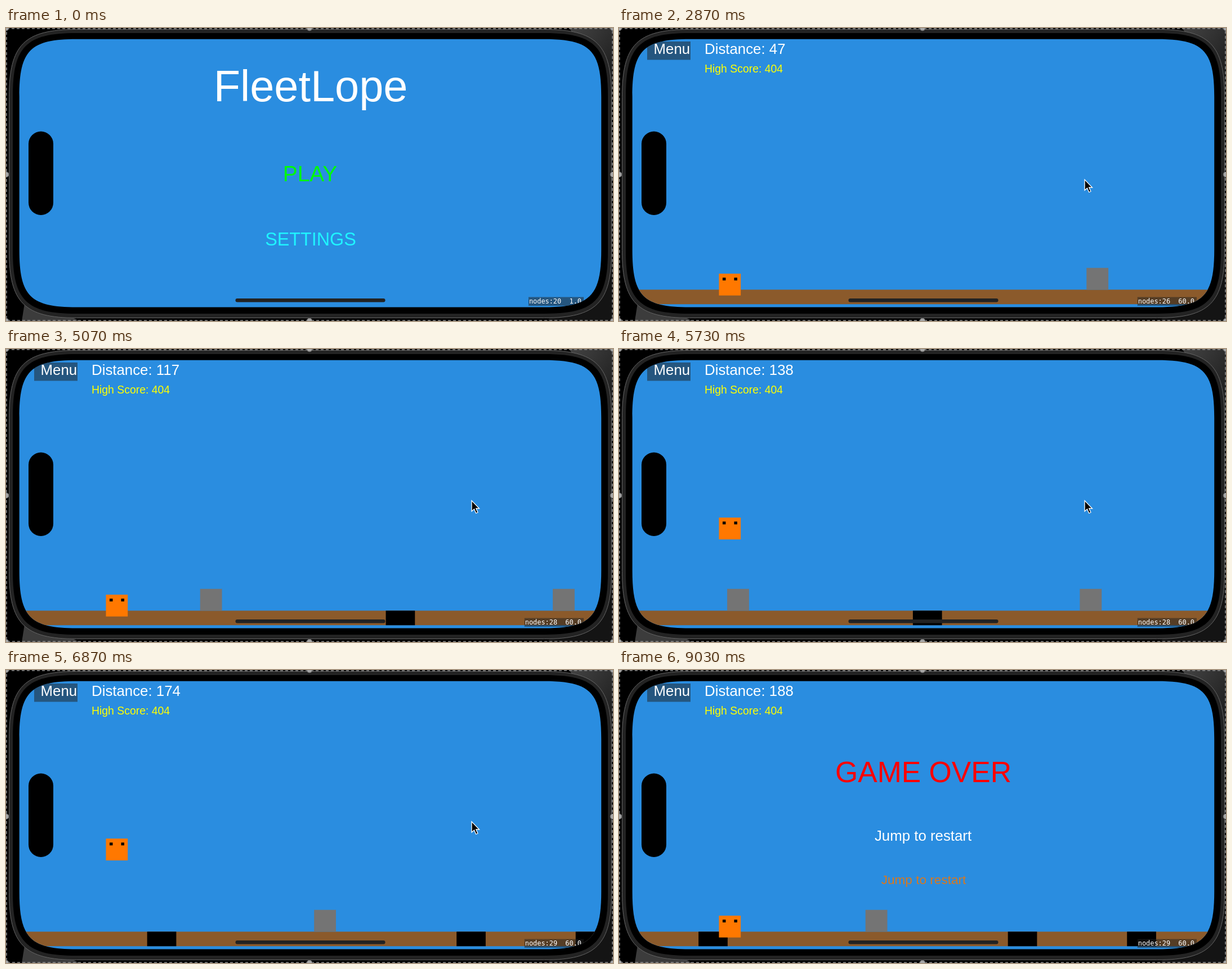
Animation of 1078 by 520 pixels, one loop 9060 ms. Source, as an HTML page:

```html
<!DOCTYPE html>
<html lang="en">
<head>
<meta charset="utf-8">
<title>Runner game</title>
<style>
  html, body { margin: 0; width: 100%; height: 100%; overflow: hidden; background: #000; }
  svg { display: block; width: 100vw; height: 100vh; }
  text { font-family: "Liberation Sans", Arial, sans-serif; fill: #fff; white-space: pre; }
  .mid { text-anchor: middle; }
  .mono { font: 11.9px "DejaVu Sans Mono", monospace; text-anchor: end; }
</style>
</head>
<body>
<svg viewBox="0 0 1078 520">
  <defs>
    <clipPath id="screen"><path id="glass"/></clipPath>
    <linearGradient id="dusk" x1="0" x2="1" y1="0" y2="1">
      <stop offset="0" stop-color="#444"/><stop offset="1" stop-color="#181818"/>
    </linearGradient>
  </defs>

  <!-- desktop and phone body -->
  <rect width="1078" height="520"/>
  <path d="M1000 0H1078V110Z" fill="url(#dusk)"/>
  <path d="M36 470L130 520H28Z" fill="#3c3c3c"/>
  <path d="M960 520L1078 410V520Z" fill="#141414"/>
  <path id="body" fill="#232323" stroke="#666"/>
  <path id="bezel"/>

  <g clip-path="url(#screen)">
    <rect x="23" y="19" width="1036" height="478" fill="#2a8de0"/>

    <g id="menu" class="mid">
      <text x="541" y="130" font-size="77.5">FleetLope</text>
      <text x="540" y="272" font-size="38.8" style="fill:#0f0">PLAY</text>
      <text x="541" y="386" font-size="32.3" style="fill:#1ff4ff">SETTINGS</text>
    </g>

    <g id="game">
      <rect x="23" y="464.4" width="1036" height="25.8" fill="#8b5a2b"/>
      <g id="things"></g>
      <g id="player">
        <rect x="177.5" y="436" width="38.7" height="38.7" fill="#ff7800"/>
        <path d="M184 443h5.5v5h-5.5zM204.5 443h5.5v5h-5.5z"/>
      </g>
      <rect x="50" y="24" width="77" height="32.5" fill="#202020" opacity=".5"/>
      <text x="61.5" y="46" font-size="25.84">Menu</text>
      <text id="score" x="152" y="46" font-size="25.84"></text>
      <text x="152" y="79" font-size="19.4" style="fill:#ff0">High Score: 404</text>
      <g id="over" class="mid">
        <text x="540.5" y="199" font-size="51.7" style="fill:#f00">GAME OVER</text>
        <text x="540" y="303" font-size="25.84">Jump to restart</text>
        <text id="hint" x="541" font-size="22.6" style="fill:#d9781e"></text>
      </g>
    </g>

    <rect id="plate" y="477.5" height="15.5" fill="#202020" opacity=".5"/>
    <text id="stats" class="mono" x="1022" y="488.5"></text>
    <rect x="407.5" y="480" width="266" height="6.5" rx="3.25" fill="#222"/>
  </g>
  <rect x="40" y="183.5" width="44" height="148.5" rx="22"/>

  <!-- selection frame -->
  <rect x="1" y="1" width="1076" height="518" fill="none" stroke="#8c8c8c" stroke-width="1.5" stroke-dasharray="5 4"/>
  <g id="handles" fill="#a6a6a6" stroke="#555"></g>
  <path id="cursor" d="M0 0V19L4.5 15L7.7 22.5L10.9 21L7.7 14H13.5Z" stroke="#fff" stroke-width="1.3"/>
</svg>
<script>
const LOOP = 9060, START = 1370, DEATH = 7320, READY = 8320;
const JUMPS = [5400, 6540], AIR = 780, HEIGHT = 140;
const POINTER_ON = 100, POINTER_OFF = 8100;
const $ = id => document.getElementById(id);

function add(parent, tag, attrs) {
  const el = document.createElementNS("http://www.w3.org/2000/svg", tag);
  for (const k in attrs) el.setAttribute(k, attrs[k]);
  return parent.appendChild(el);
}
const show = (id, on) => $(id).setAttribute("display", on ? "inline" : "none");

// box with smooth corners: e is the corner's reach, c the pull of its handles
function smoothBox(id, l, t, r, b, e, c) {
  $(id).setAttribute("d", `M${l} ${t + e}c0 ${-c} ${e - c} ${-e} ${e} ${-e}H${r - e}
    c${c} 0 ${e} ${e - c} ${e} ${e}V${b - e}c0 ${c} ${c - e} ${e} ${-e} ${e}H${l + e}
    c${-c} 0 ${-e} ${c - e} ${-e} ${-e}Z`);
}
smoothBox("body", 5.5, 2.5, 1075.5, 514.5, 120, 93);
smoothBox("bezel", 12, 9, 1069, 507, 112, 88);
smoothBox("glass", 23.7, 19.8, 1057.2, 495.6, 102, 82.5);

for (const x of [0, 539, 1078])
  for (const y of [0, 260, 520])
    if (x !== 539 || y !== 260) add($("handles"), "circle", { cx: x, cy: y, r: 5 });

const block = x => ({ x, el: add($("things"), "rect", { y: 425.7, width: 38.8, height: 38.7, fill: "#747474" }) });
const hole = x => ({ x, el: add($("things"), "rect", { y: 464.4, width: 51.7, height: 25.8 }) });
const things = [block(474.2), hole(804), block(1100.5), hole(1353.5), hole(1565)];

// distance scrolled, gently accelerating; zero at 4500 ms
const scroll = t => 0.2246 * (t - 4500) + 3.7e-6 * (t - 4500) ** 2;

// pointer stops: time, x, y
const stops = [[POINTER_ON, 300, 525], [800, 545, 262], [1250, 545, 262], [1650, 797, 269],
  [2000, 797, 269], [2400, 827, 269]];

function pointer(t) {
  const i = stops.findIndex(s => s[0] > t);
  if (i < 1) return stops[i ? stops.length - 1 : 0].slice(1);
  const [a, b] = [stops[i - 1], stops[i]];
  const u = (t - a[0]) / (b[0] - a[0]), e = u * u * (3 - 2 * u);
  return [1, 2].map(k => a[k] + (b[k] - a[k]) * e);
}

function lift(t) {
  const from = JUMPS.find(s => t > s && t < s + AIR);
  if (!from) return 0;
  const u = (t - from) / AIR;
  return 4 * HEIGHT * u * (1 - u);
}

function draw(t) {
  const playing = t >= START, run = Math.min(t, DEATH);
  show("menu", !playing);
  show("game", playing);
  show("over", t >= DEATH);
  show("cursor", t >= POINTER_ON && t < POINTER_OFF);

  for (const { x, el } of things) el.setAttribute("x", x - scroll(run));
  $("player").setAttribute("transform", `translate(0 ${-lift(t)})`);
  $("score").textContent = "Distance: " + Math.floor(Math.max(0, run - START) * 0.0317);

  const ready = t >= READY;
  $("hint").textContent = ready ? "Jump to restart" : "Restart in 1 seconds...";
  $("hint").setAttribute("y", ready ? 380 : 382);

  const nodes = playing ? 25 + [2000, 4000, 5000, 6000].filter(s => t >= s).length : 20;
  const stats = `nodes:${nodes}  ${t < 500 ? "1.0" : "60.0"}`;
  const left = 1021 - stats.length * 7.16;
  $("stats").textContent = stats;
  $("plate").setAttribute("x", left);
  $("plate").setAttribute("width", 1026 - left);

  $("cursor").setAttribute("transform", `translate(${pointer(t)})`);
}

const begin = performance.now();
function tick() {
  draw((performance.now() - begin) % LOOP);
  requestAnimationFrame(tick);
}
tick();
</script>
</body>
</html>
```
